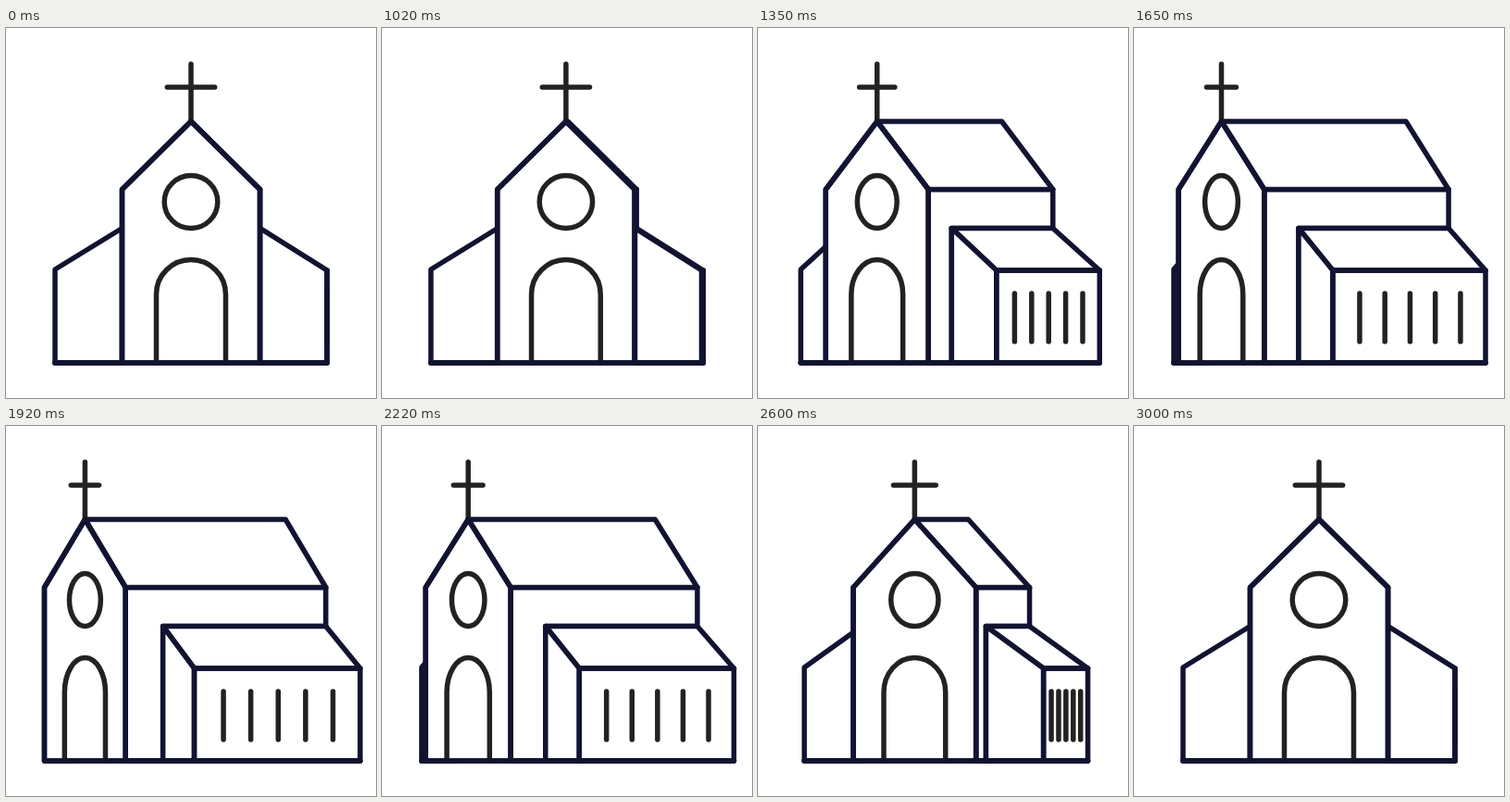
Write an HTML page that moves like this. It is 400 px wide and 400 px high and loops after 3020 ms.

```html
<!DOCTYPE html>
<html lang="en">
<head>
<meta charset="utf-8">
<title>Church</title>
<style>
  html, body { margin: 0; height: 100%; overflow: hidden; background: #fff; }
  svg { display: block; width: 100%; height: 100%; }
  path { stroke-width: 5.5; stroke-linecap: round; stroke-linejoin: round; }
  .wall { fill: #fff; stroke: #121331; }
  .edge { fill: none; stroke: #121331; }
  .detail { fill: none; stroke: #222; }
</style>
</head>
<body>
<svg viewBox="0 0 400 400">
  <path id="leftWing" class="wall"/>
  <path id="nave" class="wall"/>
  <path id="roof" class="wall"/>
  <path id="wingRoof" class="wall"/>
  <path id="wingFront" class="wall"/>
  <path id="windows" class="detail"/>
  <path id="wingSide" class="edge"/>
  <path id="details" class="detail"/>
  <path id="front" class="edge"/>
</svg>
<script>
const LOOP = 3020, BASE = 362, EAVE = 174.5, RIDGE = 101, WING_TOP = 216.5, WING_EAVE = 262;

// Cubic Bezier easing from (0,0) to (1,1), solved by bisection.
function bezier(x1, y1, x2, y2) {
  const at = (a, b, s) => 3 * a * s * (1 - s) ** 2 + 3 * b * s * s * (1 - s) + s ** 3;
  return u => {
    if (u <= 0 || u >= 1) return u <= 0 ? 0 : 1;
    let lo = 0, hi = 1;
    for (let i = 0; i < 30; i++) {
      const mid = (lo + hi) / 2;
      if (at(x1, x2, mid) < u) lo = mid; else hi = mid;
    }
    return at(y1, y2, lo);
  };
}
const turnOut = bezier(.22, .07, .24, 1);
const turnBack = bezier(.55, 0, .42, 1);

const turnAt = t => t < 2000 ? turnOut((t - 1000) / 1000) : 1 - turnBack((t - 2000) / 1000);

const set = (id, d) => document.getElementById(id).setAttribute('d', d);
const poly = (...points) => 'M' + points.join('L') + 'Z';
const line = (x1, y1, x2, y2) => `M${x1},${y1}L${x2},${y2}`;

function draw(turn) {
  const mix = (a, b) => a + (b - a) * turn;
  const apex = mix(200, 85);
  const left = mix(125.5, 41.2), right = mix(274.5, 128.7);
  const ridgeEnd = mix(200, 302.5), back = mix(274.5, 346);
  const farLeft = mix(53, 42.1), farInner = mix(125.5, 76);
  const inner = mix(274.5, 169.3), corner = mix(347, 203), end = mix(347, 383);
  const squeeze = (right - left) / 149;

  set('leftWing', poly([farLeft, BASE], [farLeft, 261], [farInner, WING_TOP], [farInner, BASE]));
  set('nave', poly([right, EAVE], [back, EAVE], [back, WING_TOP], [inner, WING_TOP], [inner, BASE], [right, BASE]));
  set('roof', poly([apex, RIDGE], [ridgeEnd, RIDGE], [back, EAVE], [right, EAVE]));
  set('wingRoof', poly([inner, WING_TOP], [back, WING_TOP], [end, WING_EAVE], [corner, WING_EAVE]));
  set('wingFront', poly([inner, WING_TOP], [corner, WING_EAVE], [corner, BASE], [inner, BASE]));
  set('wingSide', poly([corner, WING_EAVE], [end, WING_EAVE], [end, BASE], [corner, BASE]));

  let bars = '';
  for (let i = 0; i < 5; i++) {
    const x = corner + (end - corner) * (.176 + .165 * i);
    bars += line(x, 287, x, 339);
  }
  set('windows', bars);

  const arm = 25.7 * squeeze, rx = 28.8 * squeeze, door = 37.5 * squeeze;
  set('details',
    line(apex, 39, apex, RIDGE) + line(apex - arm, 64, apex + arm, 64) +
    `M${apex - rx},188a${rx},28.5 0 1 1 ${2 * rx},0a${rx},28.5 0 1 1 ${-2 * rx},0` +
    `M${apex - door},${BASE}V288a${door},37.5 0 0 1 ${2 * door},0V${BASE}`);

  set('front', poly([left, BASE], [left, EAVE], [apex, RIDGE], [right, EAVE], [right, BASE]) +
    line(farLeft, BASE, end, BASE));
}

// The far wing lies behind the front wall, so that wall needs a white face of its own.
const face = document.getElementById('front').cloneNode();
face.id = 'face';
face.setAttribute('class', 'wall');
document.getElementById('details').before(face);

function tick() {
  draw(turnAt(performance.now() % LOOP));
  face.setAttribute('d', document.getElementById('front').getAttribute('d'));
  requestAnimationFrame(tick);
}
tick();
</script>
</body>
</html>
```
